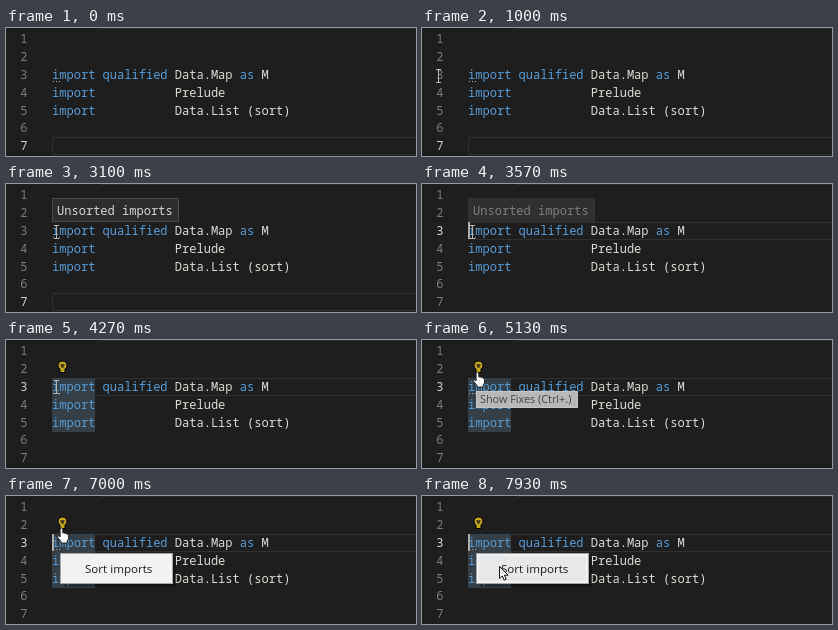
These frames come from a looping animation (410x128 px, 8000 ms). An HTML page with a canvas:

```html
<!DOCTYPE html>
<html lang="en">
<head>
<meta charset="utf-8">
<title>Sort imports quick fix</title>
<style>
  html, body { margin: 0; width: 100%; height: 100%; overflow: hidden; background: #1e1e1e; }
  canvas { display: block; }
</style>
</head>
<body>
<canvas id="stage" width="410" height="128"></canvas>
<script>
const ctx = document.getElementById('stage').getContext('2d');
const LOOP = 8000, LEFT = 46, CHAR = 7.22, ROW = 17.85;
const MONO = '500 12.05px "Noto Sans Mono", monospace';
const UI = '"Open Sans", sans-serif';
const BLUE = '#569cd6', PALE = '#dcdcd4';

const baseline = row => 15.2 + ROW * (row - 1);
const progress = (t, from, to) => Math.min(1, Math.max(0, (t - from) / (to - from)));
const ease = p => p * p * (3 - 2 * p);
const mix = (a, b, p) => a + (b - a) * p;

function rect(x, y, w, h, color) {
  ctx.fillStyle = color;
  ctx.fillRect(x, y, w, h);
}

function disc(x, y, r, color) {
  ctx.fillStyle = color;
  ctx.beginPath();
  ctx.arc(x, y, r, 0, 7);
  ctx.fill();
}

function text(str, x, y, color, font = MONO) {
  ctx.font = font;
  ctx.fillStyle = color;
  ctx.fillText(str, x, y);
}

function panel(x, y, w, h, fill, border) {
  rect(x, y, w, h, border);
  rect(x + 1, y + 1, w - 2, h - 2, fill);
}

function faded(alpha, draw) {
  if (alpha <= 0) return;
  ctx.save();
  ctx.globalAlpha = alpha;
  draw();
  ctx.restore();
}

function shape(d, x, y, fill, stroke) {
  const path = new Path2D(d);
  ctx.save();
  ctx.translate(x, y);
  ctx.fillStyle = fill;
  ctx.strokeStyle = stroke;
  ctx.lineWidth = 1;
  ctx.fill(path);
  ctx.stroke(path);
  ctx.restore();
}

function code(row, col, str, color) {
  text(str, LEFT + col * CHAR, baseline(row), color);
}

function editor(t) {
  const clicked = t >= 3560;
  const active = clicked ? 3 : 7;
  rect(0, 0, 410, 128, '#1e1e1e');
  rect(95, 0, 315, 1, '#2d2d2d');
  panel(LEFT, Math.round(baseline(active) - 13), 366, 18, '#1e1e1e', '#303030');

  if (t >= 3800) {
    const pressed = t >= 6380 && t < 6460;
    rect(LEFT, 38, 43, 54, pressed ? '#2b3339' : '#343f47');
  }

  for (let row = 1; row <= 7; row++)
    text(row, 14.3, baseline(row), row === active ? '#d0d0d0' : '#7c7c7c');
  for (let row = 3; row <= 5; row++) code(row, 0, 'import', BLUE);
  code(3, 7, 'qualified', BLUE);
  code(3, 17, 'Data.Map', PALE);
  code(3, 26, 'as', BLUE);
  code(3, 29, 'M', PALE);
  code(4, 17, 'Prelude', PALE);
  code(5, 17, 'Data.List (sort)', PALE);

  for (let i = 0; i < 3; i++) rect(47 + i * 3, 53, 1, 1, '#b0b0b0');
  if (clicked && Math.floor((t - 3540) / 495) % 2 === 0) rect(LEFT, 38, 2, 17, '#aeafad');
}

function bulb() {
  shape('M-4.5 -.5A4.5 4.5 0 0 1 4.5 -.5Q4.3 1.5 2.5 3V6.5H-2.5V3Q-4.3 1.5 -4.5 -.5Z', 56.5, 26, '#c4a81c', 'none');
  shape('M-1.8 -1.2H1.8L0 2Z', 56.5, 26, '#3a3418', '#3a3418');
}

function hint() {
  panel(46, 14, 127, 24, '#2d2d30', '#4a4a4a');
  text('Unsorted imports', 51, 31, '#d6d6d6');
}

function tooltip() {
  panel(54, 51, 102, 17, '#b8b8b8', '#c6c6c6');
  text('Show Fixes (Ctrl+.)', 58, 63.2, '#454545', '10.85px ' + UI);
}

function menu(hover) {
  rect(58, 61, 112, 30, 'rgba(0,0,0,.3)');
  panel(54, 57, 113, 31, '#f2f2f2', '#a5a5a5');
  if (hover) rect(57, 60, 107, 25, '#e6e8ea');
  text('Sort imports', 79, 77, '#1a1a1a', '11.6px ' + UI);
}

function beam(x, y) {
  shape('M-2.5 -6.5H2.5M0 -6.5V6.5M-2.5 6.5H2.5', Math.floor(x) + .5, Math.floor(y), 'none', '#b4b4b4');
}

function arrow(x, y) {
  shape('M0 0V12L2.8 9.5L4.7 13.6L6.7 12.7L4.9 8.7H8.6Z', x, y, '#fff', '#111');
}

function hand(x, y) {
  shape('M-1.4 .8Q0 -.8 1.3 .8V5Q3 4.3 3.6 5.6Q5 5 5.5 6.2Q7 6 7 7.6V10.5Q6.6 12 5.7 13V15H-.5V13.5L-3.9 9.2Q-4 7.2 -2.5 7.7L-1.4 8.8Z',
    x, y, '#fff', '#222');
}

function click(t, start, x, y) {
  if (t >= start && t < start + 80) disc(x, y, 11, 'rgba(255,245,0,.48)');
}

function pointer(t) {
  if (t < 930) return;
  if (t < 4820) {
    const enter = progress(t, 880, 1620), rise = ease(progress(t, 4270, 4680));
    const x = mix(mix(2, 50, 1 - (1 - enter) ** 2), 58, rise);
    beam(x, mix(48, 41, rise));
  } else if (t < 7390) {
    hand(55.5, 32);
  } else {
    const p = ease(progress(t, 7310, 7930));
    arrow(mix(55.5, 77.5, p), mix(32, 70.5, p));
  }
}

function draw(t) {
  editor(t);
  if (t >= 3800) bulb();
  faded(progress(t, 1770, 2010) * (1 - progress(t, 3480, 3650)), hint);
  if (t < 6460) faded(progress(t, 4990, 5130), tooltip);
  faded(progress(t, 6400, 6620), () => menu(t >= 7700));
  click(t, 3480, 50, 47);
  click(t, 6380, 55, 32);
  pointer(t);
}

function tick() {
  draw(performance.now() % LOOP);
  requestAnimationFrame(tick);
}
tick();
</script>
</body>
</html>
```
